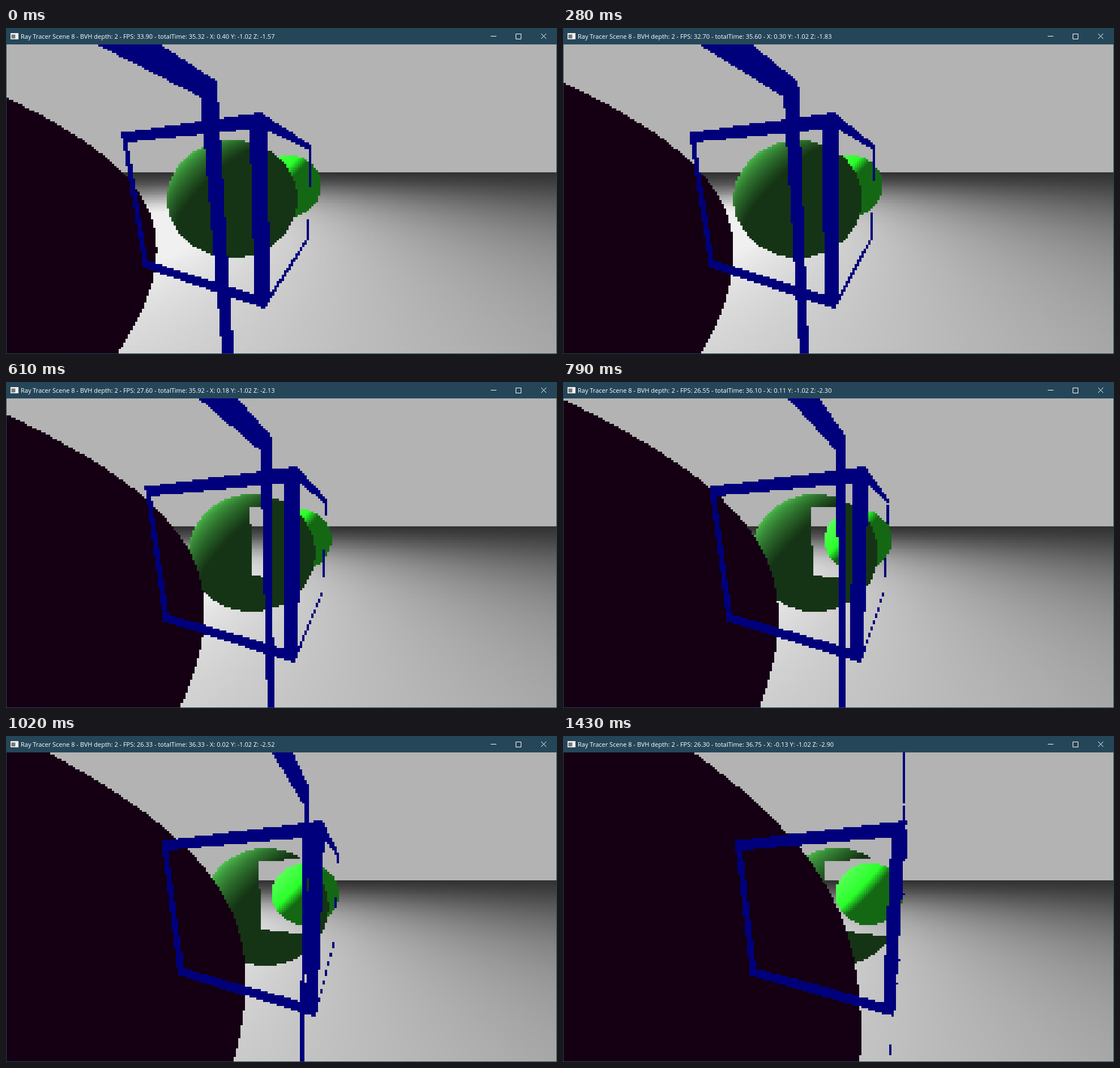
An HTML page with a canvas that plays this animation: 973x576 px, repeating every 1.48 s.

```html
<!DOCTYPE html>
<html lang="en">
<head>
<meta charset="utf-8">
<title>Ray Tracer</title>
<style>
  html, body { margin: 0; width: 100%; height: 100%; overflow: hidden; background: #254659; }
  canvas { position: absolute; left: 1px; top: 29px; width: 971px; height: 546px; image-rendering: pixelated; }
  svg { position: absolute; left: 0; top: 0; }
  text { font: 11px "Open Sans", "Noto Sans", sans-serif; fill: #fff; white-space: pre; }
</style>
</head>
<body>
<canvas id="view" width="240" height="145"></canvas>
<svg width="973" height="29">
  <path d="M8 9h14v11h-14z" fill="#f4f4f4"/>
  <path d="M9.500 11.500h7v7h-7z" fill="#777"/>
  <text id="caption" x="26" y="19"></text>
  <path d="M856 14.500h10M900.500 10.500h9v9h-9zM945 10l9 9M954 10l-9 9" fill="none" stroke="#fff"/>
</svg>
<script>
const COLS = 240, ROWS = 145;
const LOOP = 1480, STEPS = 32;
const CELL_W = 971 / COLS, CELL_H = 546 / ROWS;
const FOCAL_X = 300, FOCAL_Y = 281, HORIZON = 255;
const BLUE = [0, 0, 124];
const ctx = document.getElementById('view').getContext('2d');
const caption = document.getElementById('caption');
const image = ctx.createImageData(COLS, ROWS);

const centreX = col => 1 + (col + .5) * CELL_W;
const centreY = row => 29 + (row + .5) * CELL_H;

function setPixel(col, row, [r, g, b]) {
  image.data.set([r, g, b, 255], (row * COLS + col) * 4);
}

// Even-odd fill of closed loops, one sample per cell.
function fillLoops(loops, color) {
  for (let row = 0; row < ROWS; row++) {
    const y = centreY(row), cuts = [];
    for (const points of loops) points.forEach(([x1, y1], i) => {
      const [x2, y2] = points[(i + 1) % points.length];
      if (y1 <= y !== y2 <= y) cuts.push(x1 + (x2 - x1) * (y - y1) / (y2 - y1));
    });
    cuts.sort((a, b) => a - b);
    for (let i = 0; i + 1 < cuts.length; i += 2) {
      const first = Math.max(0, Math.ceil((cuts[i] - 1) / CELL_W - .5));
      for (let col = first; col < COLS && centreX(col) < cuts[i + 1]; col++) setPixel(col, row, color);
    }
  }
}

// The camera strafes, so points slide sideways by their inverse depth,
// which is linear in screen position over a flat face.
const sideFace = (x, y) => 54.8 + .163 * x - .065 * y;
const frontFace = (x, y) => 449 - .72 * x - .047 * y;
const slide = (points, face, shift) => points.map(([x, y]) => [x + face(x, y) * shift, y]);

function drawCage(shift) {
  const top = [450, 149.5], bottom = [457, 496];
  const side = [
    [[204, 185], top, bottom, [242, 423]],
    [[215, 202], [430, 179], [439, 471], [250, 411]]
  ];
  const front = [
    [top, [538.5, 207], [535.4, 372], bottom],
    [[462, 181], [535.5, 215], [532.4, 369], [466, 470]]
  ];
  const near = [[[158, 28], [272, 28], [373, 95], [402, 576], [382, 576], [343, 122]]];
  const fill = (loops, face) => fillLoops(loops.map(points => slide(points, face, shift)), BLUE);
  fill(side, sideFace);
  fill(front, frontFace);
  fill(near, frontFace);
}

// Light on a sphere at depth 1 where the ray (u, v, 1) meets it, or null.
function hitSphere(u, v, cx, cy, radius) {
  const b = u * cx + v * cy + 1, q = u * u + v * v + 1;
  const d = b * b - q * (cx * cx + cy * cy + 1 - radius * radius);
  if (d < 0 || b < 0) return null;
  const t = (b - Math.sqrt(d)) / q;
  return (cx - u * t + .888 * (cy - v * t) + .05 * (1 - t)) / radius;
}

function floorColor(x, y) {
  const below = y - HORIZON;
  const side = (x - 486.5) / below * .937 + 2.6;
  const depth = FOCAL_Y / below - 2.5;
  const light = Math.min(240, 50 + 210 * (3.6 / Math.hypot(3.6, side, depth)) ** 1.3);
  return [light, light, light];
}

// Window in the big sphere, bounded on the right by the near post.
function inGap(x, y, shift) {
  const dx = x - 409 - 40.3 * shift;
  const right = 366 + 174 * shift + (y - 222) * (.073 - .106 * shift);
  return dx > (y - 221) * .033 && x < right && y > 222 - .065 * dx && y < 341.1 + .115 * dx;
}

function trace(x, y, shift) {
  const u = (x - 486.5) / FOCAL_X, v = (y - 302) / FOCAL_Y;
  if (hitSphere(u, v, -2.72 + .938 * shift, .625, 1.6) !== null) return [20, 0, 18];
  let light = hitSphere(u, v, -.255 + .187 * shift, 0, .346);
  if (light !== null && !inGap(x, y, shift)) {
    light = Math.max(0, light - .34) / .75;
    return [21 + 50 * light, 52 + 125 * light, 21 + 50 * light];
  }
  light = hitSphere(u, v, .038 + .104 * shift, -.0788, .1915);
  if (light !== null) {
    light = Math.max(0, light - .12);
    return [20 + 60 * light, Math.min(255, 104 + 420 * light), 20 + 60 * light];
  }
  return y < HORIZON ? [179, 179, 179] : floorColor(x, y);
}

function draw(step) {
  // Steady strafe after a short start-up lag.
  const shift = .0432 * step - .02 * (1 - Math.exp(-step / 2));
  for (let row = 0; row < ROWS; row++)
    for (let col = 0; col < COLS; col++)
      setPixel(col, row, trace(centreX(col), centreY(row), shift));
  drawCage(shift);
  ctx.putImageData(image, 0, 0);

  const fps = 26.3 + 7.7 / (1 + Math.exp((step - 9.5) / 2.2));
  const clock = 35.32 + .0461 * step, x = .4 - .0171 * step, z = -1.57 - .043 * step;
  caption.textContent = `Ray Tracer Scene 8 - BVH depth: 2 - FPS: ${fps.toFixed(2)} - ` +
    `totalTime: ${clock.toFixed(2)} - X: ${x.toFixed(2)} Y: -1.02 Z: ${z.toFixed(2)}`;
}

let drawn = -1;
function tick() {
  const t = performance.now() % LOOP;
  const step = Math.min(STEPS - 1, Math.floor((t + 7) * STEPS / LOOP));
  if (step !== drawn) draw(drawn = step);
  requestAnimationFrame(tick);
}
tick();
</script>
</body>
</html>
```
